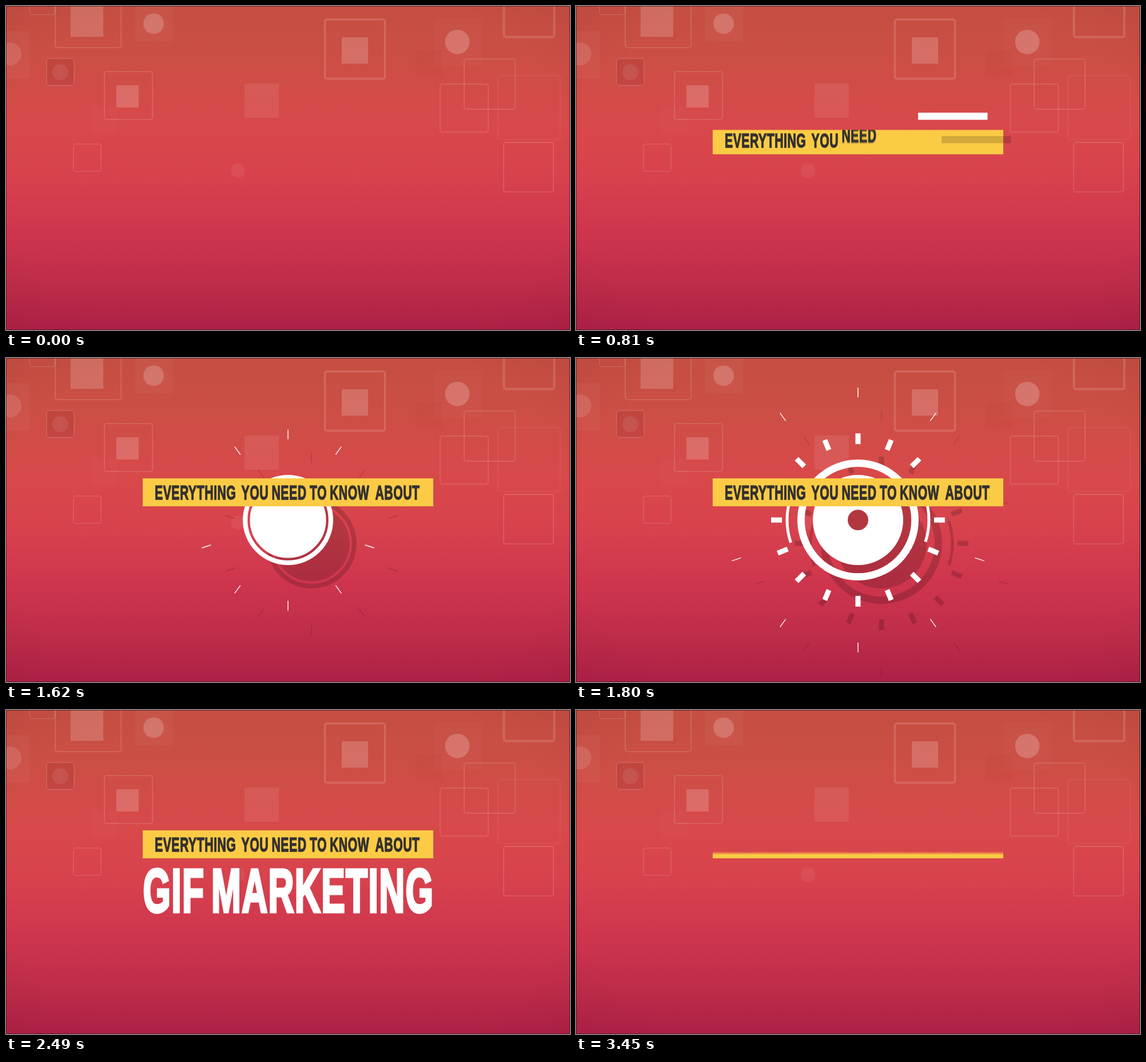
An HTML page for the animation above (3.48 s loop, 986 by 568 pixels).

```html
<!DOCTYPE html>
<html lang="en">
<head>
<meta charset="utf-8">
<title>Title card</title>
<style>
@property --t { syntax: "<number>"; inherits: true; initial-value: 0; }
@property --edge { syntax: "<length>"; inherits: false; initial-value: 49px; }
@property --fade { syntax: "<length>"; inherits: false; initial-value: 1px; }

:root { --loop: 3480ms linear infinite; }
html, body { margin: 0; width: 100%; height: 100%; overflow: hidden; }
.stage {
  position: relative; width: 986px; height: 568px; overflow: hidden;
  background:
    radial-gradient(ellipse 75% 85% at 50% 50%, transparent 70%, rgba(110, 10, 40, .1)),
    linear-gradient(#c44f41, #cd4e45 18%, #d8494a 36%, #d8424d 52%, #ce354d 70%, #bf2d4a 85%, #ad2145);
}
.stage::after {
  content: ""; position: absolute; inset: 0;
  box-shadow: inset 0 0 0 1px rgba(50, 10, 20, .6);
}
svg { position: absolute; left: 0; top: 0; overflow: visible; }
text { font: bold 35px "Liberation Sans", Arial, sans-serif; }

/* backdrop */
.frames rect { fill: none; stroke: #fff; }
.marks { fill: #fff; }

/* both layers cast a hard offset shadow */
.burst, .lines { filter: drop-shadow(41px 41px 0 rgba(0, 0, 0, .17)); fill: #fff; }
.burst circle { fill: none; stroke: #fff; }

.line { animation: top-line var(--loop); }
.line.low { animation-name: low-line; }
@keyframes top-line {
  0%, 4.3% { translate: 182px 187px; scale: 0 12.5; }
  13.8% { translate: 250px 187px; scale: 250 12.5; }
  23.28% { translate: 597px 187px; scale: 122 12.5; }
  27.6%, 100% { translate: 797px 187px; scale: 0 12.5; }
}
@keyframes low-line {
  0%, .5% { translate: 803px 370px; scale: 0 12.5; }
  10.3% { translate: 420px 370px; scale: 250 12.5; }
  19.8%, 100% { translate: 182px 370px; scale: 0 12.5; }
}

.disc { animation: disc var(--loop); }
@keyframes disc {
  0%, 41.38% { r: 0px; stroke-width: 0; animation-timing-function: cubic-bezier(.333, .667, .667, 1); }
  50% { r: 39.5px; stroke-width: 79; }
  51.72% { r: 48.25px; stroke-width: 61.5; }
  56.32%, 100% { r: 80px; stroke-width: 0; }
}
.ring { animation: ring var(--loop); }
@keyframes ring {
  0%, 43.1% { r: 30px; stroke-width: 0; animation-timing-function: cubic-bezier(.333, .667, .667, 1); }
  51.72% { r: 99.6px; stroke-width: 12.8; }
  60.34% { r: 105.5px; stroke-width: 9.5; }
  65.52%, 100% { r: 110px; stroke-width: 0; }
}
.orbit { animation: orbit var(--loop); }
@keyframes orbit {
  0%, 48.28% { stroke-dasharray: 0 180; stroke-dashoffset: 70; stroke-width: 5; }
  51.72% { stroke-dasharray: 36 144; stroke-dashoffset: 19; stroke-width: 5; }
  58.62% { stroke-dasharray: 180 0; stroke-dashoffset: -40; stroke-width: 1.4; }
  62% { stroke-dasharray: 180 0; stroke-dashoffset: -40; stroke-width: 1.3; }
  65.52%, 100% { stroke-dasharray: 180 0; stroke-dashoffset: -40; stroke-width: 0; }
}
.sweep { stroke-width: 8; animation: sweep var(--loop); }
@keyframes sweep {
  0%, 53.45% { stroke-dasharray: 0 180; stroke-dashoffset: 60; }
  60.34% { stroke-dasharray: 33.7 146.3; stroke-dashoffset: -7.3; }
  65.23%, 100% { stroke-dasharray: 0 180; stroke-dashoffset: -80; }
}

.tick { animation: tick-fly var(--loop), tick-size var(--loop); }
@keyframes tick-fly {
  0%, 44.83% { translate: 0 -17px; animation-timing-function: cubic-bezier(.333, .667, .667, 1); }
  65.06%, 100% { translate: 0 -238px; }
}
@keyframes tick-size {
  0%, 44.82% { scale: 0 0; }
  44.83%, 51.72% { scale: 9 19; }
  60.34% { scale: 5 2.5; }
  64.08% { scale: 3 1; }
  65.06%, 100% { scale: 0 0; }
}
.ray { animation: ray-fly var(--loop), ray-size var(--loop); }
@keyframes ray-fly {
  0%, 42.53% { translate: 0 -64px; animation-timing-function: cubic-bezier(.333, .667, .667, 1); }
  58.48%, 100% { translate: 0 -258px; }
}
@keyframes ray-size {
  0%, 42.52% { scale: 0 0; }
  42.53%, 54.6% { scale: 1.4 17; }
  58.48%, 100% { scale: 1.4 0; }
}

/* yellow strip, opening upward from its lower edge */
.bar {
  position: absolute; left: 239px; top: 211px; width: 508px; height: 49px;
  background: #fccb45;
  mask-image: linear-gradient(transparent var(--edge), #000 calc(var(--edge) + var(--fade)));
  animation: strip var(--loop), clock var(--loop);
}
@keyframes clock { from { --t: 0; } to { --t: 3480; } }
@keyframes strip {
  0%, 11.49% { --edge: 49px; --fade: 1px; animation-timing-function: cubic-bezier(.333, .667, .667, 1); }
  30.17%, 92.24% { --edge: -1px; --fade: 1px; animation-timing-function: cubic-bezier(.333, 0, .667, .333); }
  99.13%, 100% { --edge: 37px; --fade: 6px; }
}
.bar text {
  --k: clamp(0, 1 - (var(--t) - var(--start)) / 160, 1);
  fill: #33302f; stroke: #33302f; stroke-width: 1.4; letter-spacing: .9px;
  translate: 0 calc(-34px * pow(var(--k), 2));
  filter: blur(calc(1.6px * var(--k)));
}

.title { position: absolute; left: 230px; top: 260px; width: 530px; height: 100px; overflow: hidden; }
.title g { animation: title var(--loop); }
.title text { font-size: 107px; letter-spacing: 2.6px; fill: #fff; stroke: #fff; stroke-width: 5; }
@keyframes title {
  0%, 64.08% { translate: 0 -102px; animation-timing-function: cubic-bezier(.333, .667, .667, 1); }
  70.98%, 92.24% { translate: 0 0; animation-timing-function: cubic-bezier(.333, 0, .667, .333); }
  98.6%, 100% { translate: 0 -102px; }
}
</style>
</head>
<body>
<div class="stage">
  <svg width="986" height="568">
    <g class="marks">
      <rect x="226" y="-4" width="66" height="66" rx="3" opacity=".03"/>
      <rect x="748" y="22" width="83" height="84" rx="3" opacity=".02"/>
      <rect x="-42" y="44" width="84" height="84" rx="3" opacity=".03"/>
      <rect x="148" y="176" width="48" height="48" opacity=".01"/>
      <rect x="716" y="77" width="46" height="47" fill="#601018" opacity=".03"/>
      <rect x="71" y="92" width="48" height="47" fill="#701018" opacity=".13"/>
      <rect x="113" y="-3" width="57" height="57" opacity=".17"/>
      <circle cx="258" cy="31" r="18" opacity=".19"/>
      <rect x="587" y="55" width="46" height="46" opacity=".18"/>
      <circle cx="789" cy="63" r="21.5" opacity=".2"/>
      <circle cx="7" cy="84" r="20" opacity=".11"/>
      <circle cx="95" cy="116" r="14" opacity=".08"/>
      <rect x="193" y="139" width="39" height="39" opacity=".18"/>
      <rect x="417" y="136" width="60" height="60" opacity=".08"/>
      <circle cx="405.5" cy="289" r="12.5" opacity=".06"/>
    </g>
    <g class="frames" id="frames"></g>
  </svg>

  <svg width="986" height="568">
    <g class="burst" transform="translate(493 284)">
      <g id="rays"></g>
      <circle class="disc"/>
      <circle class="ring"/>
      <circle class="orbit" r="124" pathLength="360"/>
      <circle class="sweep" r="158.5" pathLength="360"/>
    </g>
  </svg>

  <div class="title">
    <svg width="530" height="100"><g>
      <text transform="translate(9.5 94) scale(.58 1)">GIF</text>
      <text transform="translate(129 94) scale(.58 1)">MARKETING</text>
    </g></svg>
  </div>

  <div class="bar"><svg width="508" height="49" id="words"></svg></div>

  <svg width="986" height="568">
    <g class="lines">
      <rect class="line" width="1" height="1"/>
      <rect class="line low" width="1" height="1"/>
    </g>
  </svg>
</div>

<script>
const fill = (id, parts) => { document.getElementById(id).innerHTML = parts.join(""); };

// x, y, width, height, line weight, opacity
const frames = [
  [41, -40, 45, 55, 2, .1], [86, -40, 115, 113, 2, .12], [557.5, 23.5, 105, 104, 3.5, .14],
  [870.5, -30, 88, 84.5, 4, .14], [801, 93, 89, 88, 2, .12], [759, 137, 84, 84, 2, .11],
  [870, 239, 87, 87, 2, .12], [860, 122, 109, 112, 4, .03], [71, 92, 48, 47, 2, .11],
  [172, 115, 84, 84, 2, .12], [118, 242, 48, 48, 2, .1]
];
fill("frames", frames.map(([x, y, w, h, weight, alpha]) =>
  `<rect x="${x}" y="${y}" width="${w}" height="${h}" rx="4" stroke-width="${weight}" opacity="${alpha}"/>`));

const spokes = (count, kind) => Array.from({ length: count }, (_, i) =>
  `<g transform="rotate(${i * 360 / count})"><rect class="${kind}" x="-.5" y="-.5" width="1" height="1"/></g>`);
fill("rays", [...spokes(16, "tick"), ...spokes(10, "ray")]);

const words = [["EVERYTHING", 21], ["YOU", 172.5], ["NEED", 225.5], ["TO", 292], ["KNOW", 327], ["ABOUT", 406.5]];
fill("words", words.map(([word, x], i) =>
  `<text style="--start:${386 + 175 * i}" transform="translate(${x} 37.3) scale(.605 1)">${word}</text>`));
</script>
</body>
</html>
```
